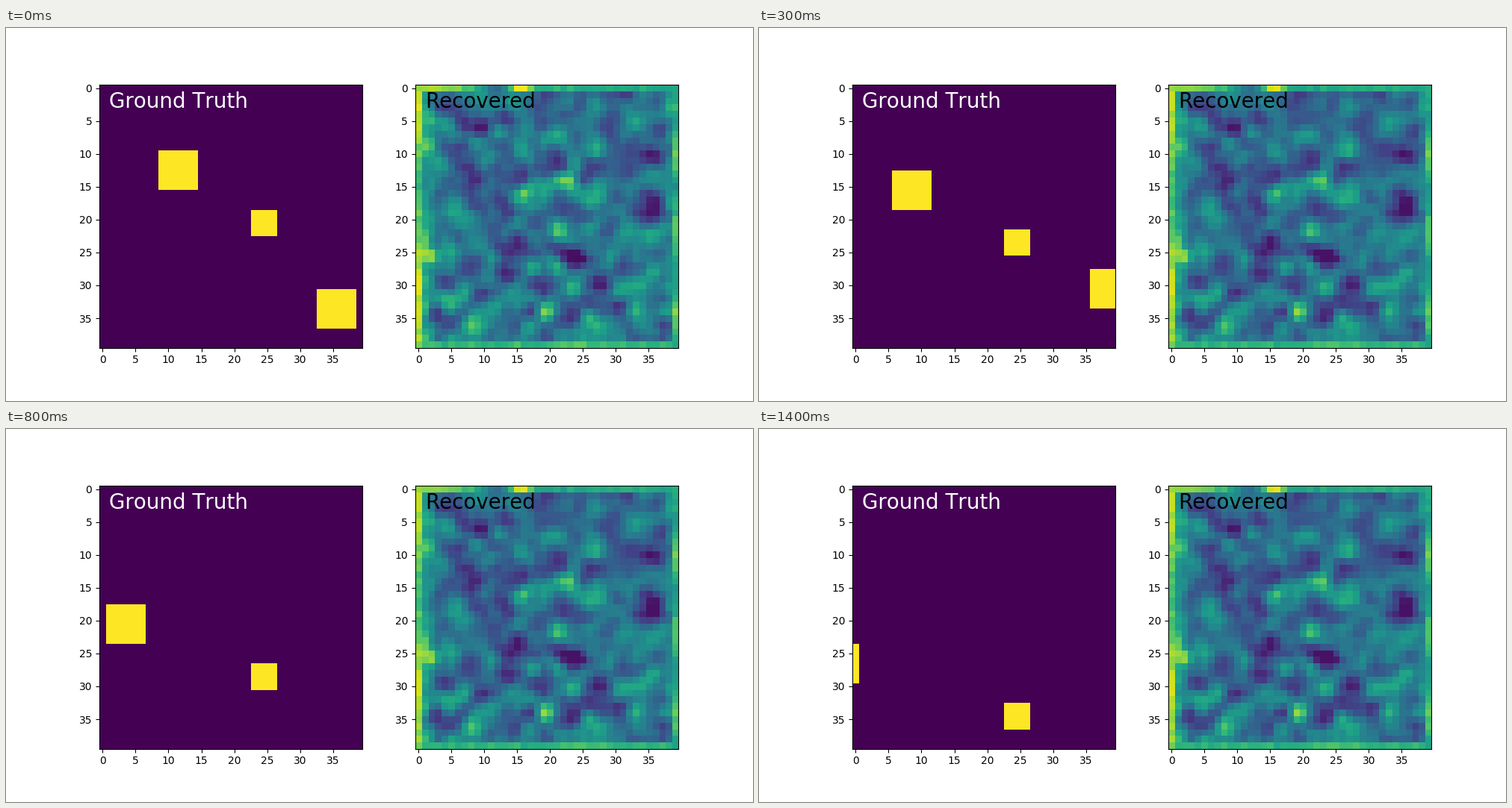
Recreate the animation shown at these times as a matplotlib script. Size 1000 px wide and 500 px high, loop 1500 ms.

```python
import numpy as np
import matplotlib.pyplot as plt
from matplotlib.animation import FuncAnimation

SIZE = 40
FRAMES = 15
ROWS, COLS = np.mgrid[:SIZE, :SIZE]

# Most visible spots of the estimate, as (column, row)
BRIGHT = [(16, 15.5), (23, 14), (27, 10), (23.3, 30.2), (19.3, 34), (2, 25.5)]
DARK = [(35.5, 10), (8, 14), (23.5, 17.6), (35.5, 18), (15, 23.4),
        (23.5, 26.3), (27.5, 30), (24, 34)]

rng = np.random.default_rng(7)


def texture():
    """Unit-variance noise in soft patches about two cells wide."""
    noise = rng.standard_normal((SIZE, SIZE))
    for axis in (0, 1):
        noise = noise + .6 * (np.roll(noise, 1, axis) + np.roll(noise, -1, axis))
    return (noise - noise.mean()) / noise.std()


def bump(x, centre, width):
    return np.exp(-((x - centre) / width) ** 2)


def spots(centres, width):
    return sum(bump(COLS, x, width) * bump(ROWS, y, width) for x, y in centres)


def wave(x, peak, period):
    return np.cos(2 * np.pi * (x - peak) / period)


def recovered_field():
    field = .36 + .1 * texture()
    field += .35 * spots(BRIGHT, 1.3) - .22 * spots(DARK, 1.9)
    field += .2 * bump(COLS, 1, 1.3) + .1 * bump(COLS, 38, .6)
    field = np.clip(field, .05, .85)

    along = np.arange(SIZE)
    grain = .03 * rng.standard_normal((4, SIZE))
    field[-1] = .65 + .07 * bump(along, 24, 3) + grain[0]
    field[:, -1] = .64 + .1 * wave(along, 10, 12) + grain[1]
    field[0] = (.6 + .28 * bump(along, 0, 8) - .25 * bump(along, 11.5, 2)
                + .38 * bump(along, 15.5, 1.5) + grain[2])
    field[:, 0] = .8 + .11 * wave(along, 3, 28) + grain[3]
    return field


recovered = recovered_field()
settling = .02 + .03 * texture()


def truth(n):
    grid = np.zeros((SIZE, SIZE))
    for col, row, side in ((9 - n, 10 + n, 6), (23, 19 + n, 4), (33 + n, 31 - n, 6)):
        grid[row:row + side, max(col, 0):col + side] = 1
    return grid


def estimate(n):
    return recovered + settling * np.exp(-2 * n)


def panel(ax, data, title, color):
    ax.set_xticks(range(0, SIZE, 5))
    ax.set_yticks(range(0, SIZE, 5))
    ax.text(1, 3, title, fontsize=20, color=color)
    return ax.imshow(data, cmap="viridis", vmin=0, vmax=1, interpolation="nearest")


plt.rcParams["font.family"] = "DejaVu Sans"
plt.rcParams["text.kerning_factor"] = 6  # whole-pixel letter spacing
fig, (left, right) = plt.subplots(1, 2, figsize=(10, 5), dpi=100)
fig.subplots_adjust(left=.125, right=.9, bottom=.11, top=.88, wspace=.2)
truth_image = panel(left, truth(0), "Ground Truth", "white")
estimate_image = panel(right, estimate(0), "Recovered", "black")


def update(n):
    truth_image.set_data(truth(n))
    estimate_image.set_data(estimate(n))
    return truth_image, estimate_image


anim = FuncAnimation(fig, update, frames=FRAMES, interval=100, repeat=True)
plt.show()
```
